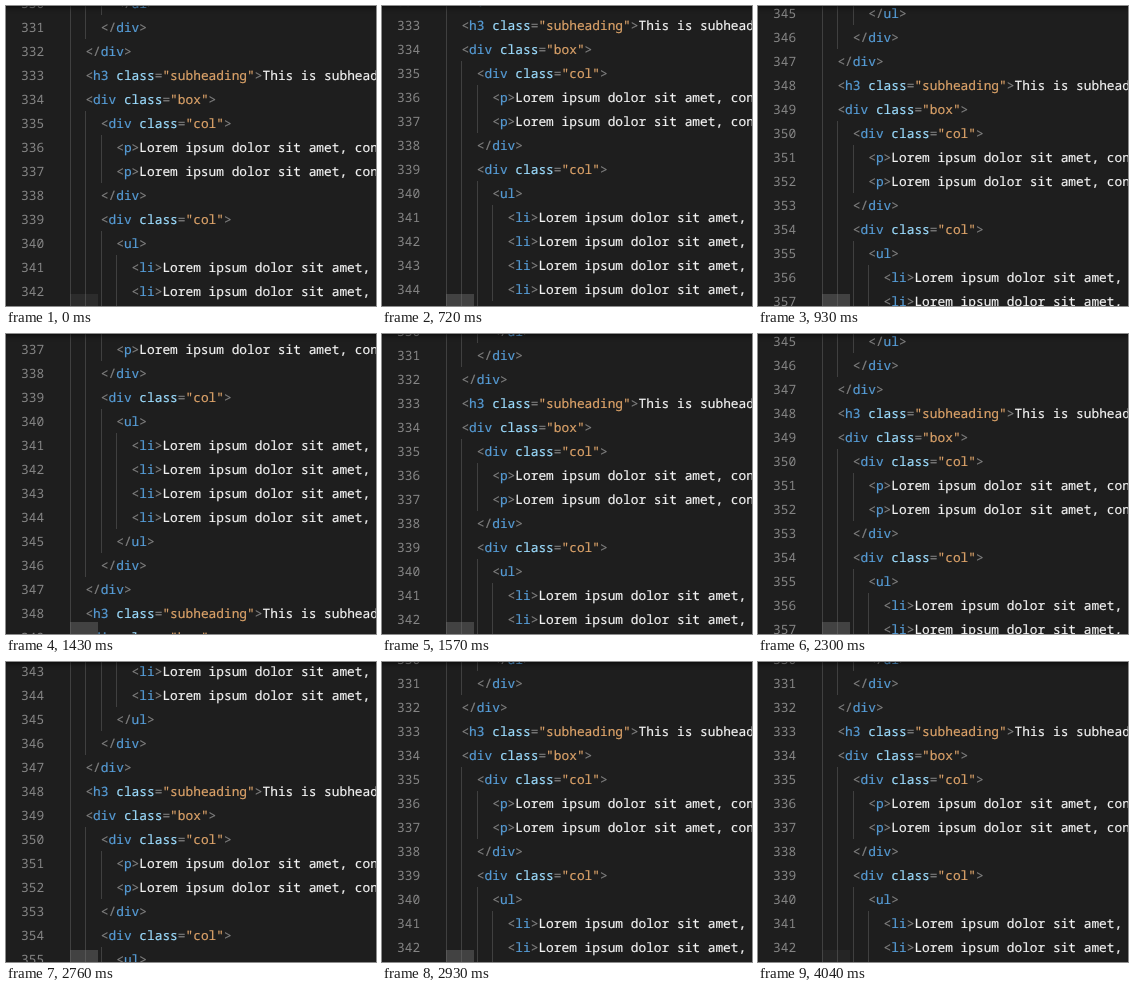
These frames come from a looping animation (370x300 px, 4110 ms). An HTML page:

```html
<!DOCTYPE html>
<html lang="en">
<head>
<meta charset="utf-8">
<title>Code editor scrolling</title>
<style>
html, body { margin: 0; width: 100%; height: 100%; overflow: hidden; background: #1e1e1e; }
#editor {
  position: relative; width: 370px; height: 300px; overflow: hidden;
  background: #1e1e1e; color: #f2f2f2;
  /* 0.6em advance: 7.7px per character */
  font: 12.8333px/24px "Noto Sans Mono", "DejaVu Sans Mono", monospace;
  font-variant-ligatures: none;
  text-rendering: geometricPrecision;
}
#lines { position: absolute; left: 0; top: -15px; width: 370px; }
.row { position: relative; height: 24px; white-space: pre; }
.num { position: absolute; left: 15px; color: #858585; }
.code { position: absolute; left: 64px; -webkit-text-stroke: .2px; }
.guide { position: absolute; top: 0; width: 1px; height: 24px; background: #404040; }
.p { color: #808080; }
.t { color: #569cd6; }
.a { color: #9cdcfe; }
.s { color: #dba269; }
#shadow { position: absolute; inset: 0; box-shadow: #000 0 6px 6px -6px inset; }
#slider { position: absolute; left: 64px; top: 288px; width: 28px; height: 12px; background: rgba(121, 121, 121, .4); }
</style>
</head>
<body>
<div id="editor">
  <div id="lines"></div>
  <div id="shadow"></div>
  <div id="slider"></div>
</div>
<script>
const LOOP = 4110, FIRST = 330, LAST = 358, INDENT = 15.4;
const NOTCH = 50, NOTCHES = 7;
const LOREM = 'Lorem ipsum dolor sit amet, consectetur';

const span = (cls, text) => `<span class="${cls}">${text}</span>`;
const open = (tag, name) => span('p', '&lt;') + span('t', tag) +
  (name ? ' ' + span('a', 'class') + span('p', '=') + span('s', `"${name}"`) : '') + span('p', '&gt;');
const close = tag => span('p', '&lt;/') + span('t', tag) + span('p', '&gt;');

// The document repeats this block of [depth, markup] every 15 lines.
const para = [3, open('p') + LOREM];
const item = [4, open('li') + LOREM];
const block = [
  [1, open('h3', 'subheading') + 'This is subheading'],
  [1, open('div', 'box')],
  [2, open('div', 'col')],
  para, para,
  [2, close('div')],
  [2, open('div', 'col')],
  [3, open('ul')],
  item, item, item, item,
  [3, close('ul')],
  [2, close('div')],
  [1, close('div')]
];

function row(n) {
  const [depth, markup] = block[(n - 333 + block.length) % block.length];
  let guides = '';
  for (let k = 0; k < depth; k++) {
    guides += `<i class="guide" style="left:${64 + Math.round(INDENT * k)}px"></i>`;
  }
  return `<div class="row">${guides}<span class="num">${n}</span>` +
    `<span class="code">${'  '.repeat(depth)}${markup}</span></div>`;
}

const lines = document.getElementById('lines');
let html = '';
for (let n = FIRST; n <= LAST; n++) html += row(n);
lines.innerHTML = html;

// One flick of the wheel: whole notches spread over a few repaints.
// A pace above 1 bunches the repaints at the beginning.
function flick(down, start, end, paints, pace) {
  return Array.from({ length: paints }, (_, i) => {
    const moved = Math.round(NOTCHES * (i + 1) / paints);
    const y = NOTCH * (down ? moved : NOTCHES - moved);
    const time = start + (end - start) * (i / (paints - 1)) ** pace;
    return { offset: time / LOOP, transform: `translateY(${-y}px)`, easing: 'step-end' };
  });
}

const top0 = { transform: 'translateY(0)', easing: 'step-end' };
const scroll = [
  { offset: 0, ...top0 },
  ...flick(true, 690, 930, 7, 1),
  ...flick(false, 1360, 1570, 6, 1.2),
  ...flick(true, 2060, 2300, 7, .9),
  ...flick(false, 2730, 2930, 5, 1),
  { offset: 1, ...top0 }
];

// The slider appears quickly and later fades out over 800ms.
const fade = [
  { offset: 0, opacity: .4, easing: 'step-end' },
  { offset: 40 / LOOP, opacity: 1 },
  { offset: 3400 / LOOP, opacity: 1 },
  { offset: 1, opacity: 1 - (LOOP - 3400) / 800 }
];

const timing = { duration: LOOP, iterations: Infinity };
const runs = [
  lines.animate(scroll, timing),
  document.getElementById('slider').animate(fade, timing)
];
runs.forEach(run => { run.startTime = document.timeline.currentTime; });
</script>
</body>
</html>
```
